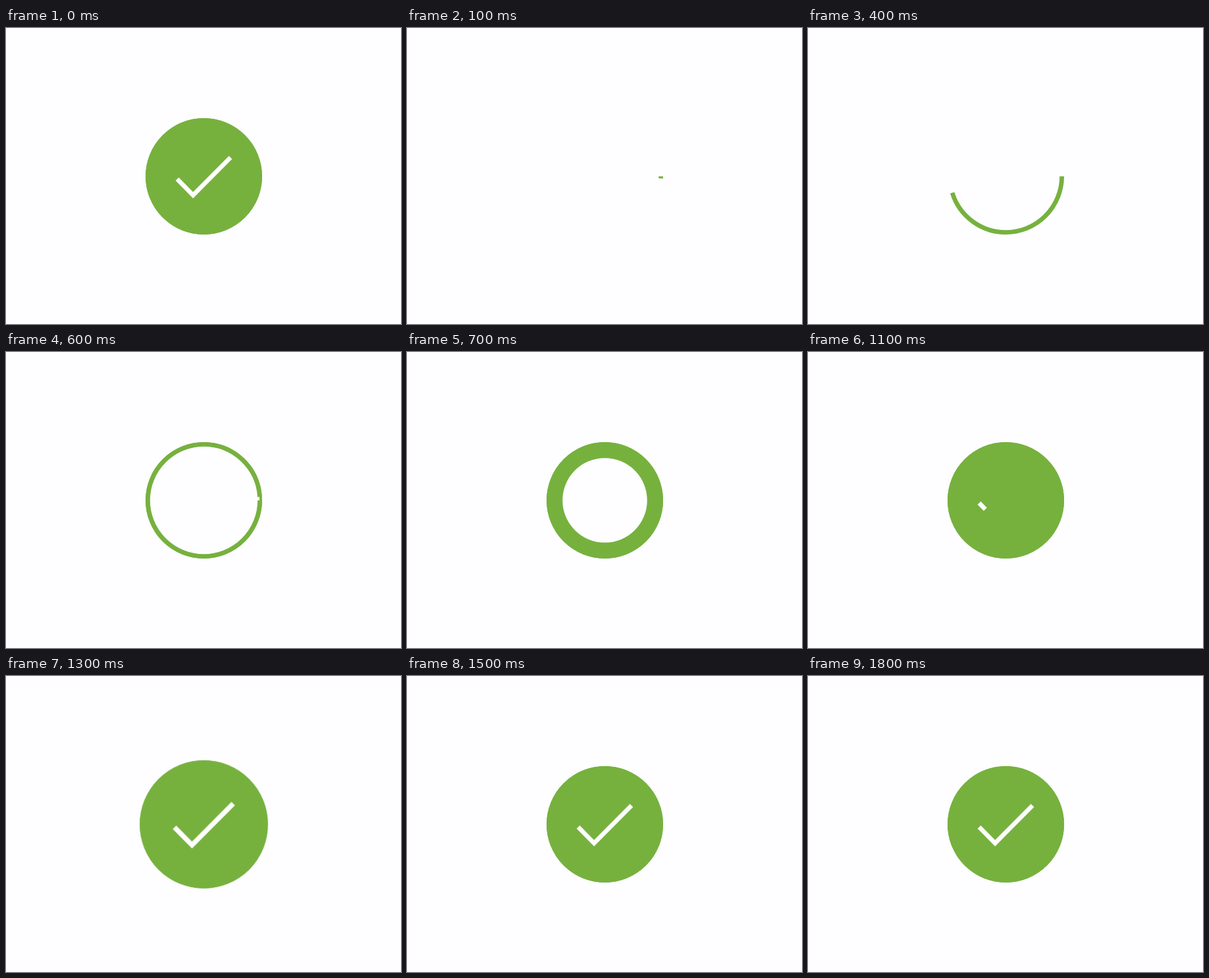
Recreate the animation shown at these times as an HTML page. Size 600 by 450 pixels, loop 1.9 s.

```html
<!DOCTYPE html>
<html lang="en">
<head>
<meta charset="utf-8">
<title>Check mark</title>
<style>
  :root { --t: 1900ms; --green: #76b13e; }
  html, body { margin: 0; width: 100%; height: 100%; overflow: hidden; background: #fefdff; }

  /* Paused animations are scrubbed through a negative delay */
  .badge, .ring, .check { animation-play-state: paused; animation-fill-mode: both; }

  .badge {
    position: absolute; left: 212px; top: 137px; width: 177px; height: 177px;
    border-radius: 50%;
    animation-name: fill, pop;
    animation-duration: 480ms, 360ms;
    animation-timing-function: ease-in-out;
    animation-delay: calc(532ms - var(--t)), calc(1121ms - var(--t));
  }
  svg { display: block; width: 100%; height: 100%; }
  .ring, .check {
    fill: none; stroke-width: 2;
    animation-name: draw;
    animation-timing-function: cubic-bezier(.65, 0, .45, 1);
  }
  .ring {
    stroke: var(--green); stroke-dasharray: 166; stroke-dashoffset: 166;
    animation-duration: 703ms;
    animation-delay: calc(43ms - var(--t));
  }
  .check {
    stroke: #fff; stroke-dasharray: 48; stroke-dashoffset: 48;
    animation-duration: 360ms;
    animation-delay: calc(1002ms - var(--t));
  }

  @keyframes draw { to { stroke-dashoffset: 0; } }
  @keyframes fill {
    from { box-shadow: inset 0 0 0 0 var(--green); }
    to { box-shadow: inset 0 0 0 94.8px var(--green); }
  }
  @keyframes pop {
    0%, 100% { transform: scale(1); }
    50% { transform: scale(1.1); }
  }
</style>
</head>
<body>
<div class="badge">
  <svg viewBox="0 0 52 52">
    <circle class="ring" cx="26" cy="26" r="25"/>
    <path class="check" d="M14.1 27.2l7.1 7.2 16.7-16.8"/>
  </svg>
</div>
<script>
  const LOOP = 1900, STEP = 100;
  const root = document.documentElement;
  const start = performance.now();

  function tick() {
    const time = (performance.now() - start) % LOOP;
    // The loop opens on the finished badge, then restarts
    const t = Math.floor(time / STEP) * STEP || LOOP;
    root.style.setProperty('--t', t + 'ms');
    requestAnimationFrame(tick);
  }
  tick();
</script>
</body>
</html>
```
